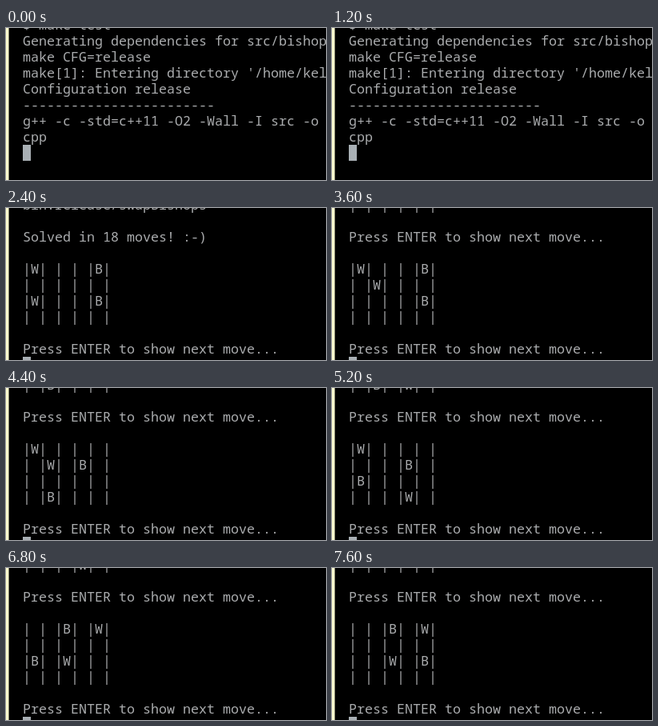
An HTML page with a canvas for the animation above (8000 ms loop, 400 by 190 pixels).

```html
<!DOCTYPE html>
<html lang="en">
<head>
<meta charset="utf-8">
<title>Swapping bishops in a terminal</title>
<style>
  html, body { margin: 0; height: 100%; overflow: hidden; background: #000; }
  canvas { display: block; }
</style>
</head>
<body>
<canvas id="terminal" width="400" height="190"></canvas>
<script>
const ctx = document.getElementById('terminal').getContext('2d', { alpha: false });

const LOOP = 8000, SOLVED_AT = 2400, FIRST_MOVE_AT = 3600, MOVE_EVERY = 400;
const LEFT = 21, TOP = -14, CELL_W = 10, CELL_H = 20, BASELINE = 16;
const PROMPT = 'Press ENTER to show next move...';

const BUILD_LOG = [
  '$ make test',
  'Generating dependencies for src/bishop',
  'make CFG=release',
  "make[1]: Entering directory '/home/kel",
  'Configuration release',
  '-'.repeat(24),
  'g++ -c -std=c++11 -O2 -Wall -I src -o',
  'cpp',
];

// Each piece is [letter, row, column]; each move is [piece index, row, column].
const START = [['W', 0, 0], ['W', 2, 0], ['B', 0, 4], ['B', 2, 4]];
const MOVES = [
  [1, 1, 1], [2, 3, 1], [3, 1, 3], [1, 3, 3], [2, 2, 0], [3, 0, 2],
  [0, 2, 2], [0, 0, 4], [1, 2, 2], [3, 2, 4], [2, 0, 2],
];

function boardAfter(count) {
  const pieces = START.map(piece => [...piece]);
  for (const [index, row, col] of MOVES.slice(0, count)) {
    pieces[index] = [pieces[index][0], row, col];
  }
  const grid = Array.from({ length: 4 }, () => Array(5).fill(' '));
  for (const [letter, row, col] of pieces) grid[row][col] = letter;
  return grid.map(row => `|${row.join('|')}|`);
}

function linesAt(time) {
  if (time < SOLVED_AT) return BUILD_LOG;
  const count = Math.max(0, Math.floor((time - FIRST_MOVE_AT) / MOVE_EVERY) + 1);
  const head = count
    ? [boardAfter(count - 1)[3], '', PROMPT, '']
    : ['bin.release/swapBishops', '', 'Solved in 18 moves! :-)', ''];
  return [...head, ...boardAfter(count), '', PROMPT];
}

function draw(time) {
  const lines = linesAt(time);
  ctx.fillStyle = '#000';
  ctx.fillRect(0, 0, 400, 190);
  ctx.fillStyle = '#ffffd0';
  ctx.fillRect(0, 0, 3.5, 190);

  ctx.font = '16.667px "Noto Sans Mono", monospace';
  ctx.fillStyle = '#aaacae';
  lines.forEach((line, row) => {
    [...line].forEach((char, col) => {
      ctx.fillText(char, LEFT + col * CELL_W, TOP + row * CELL_H + BASELINE);
    });
  });

  ctx.fillStyle = '#a9b0b5';
  ctx.fillRect(LEFT, TOP + lines.length * CELL_H, CELL_W, CELL_H);
}

const startTime = performance.now();
function tick() {
  draw((performance.now() - startTime) % LOOP);
  requestAnimationFrame(tick);
}
tick();
</script>
</body>
</html>
```
